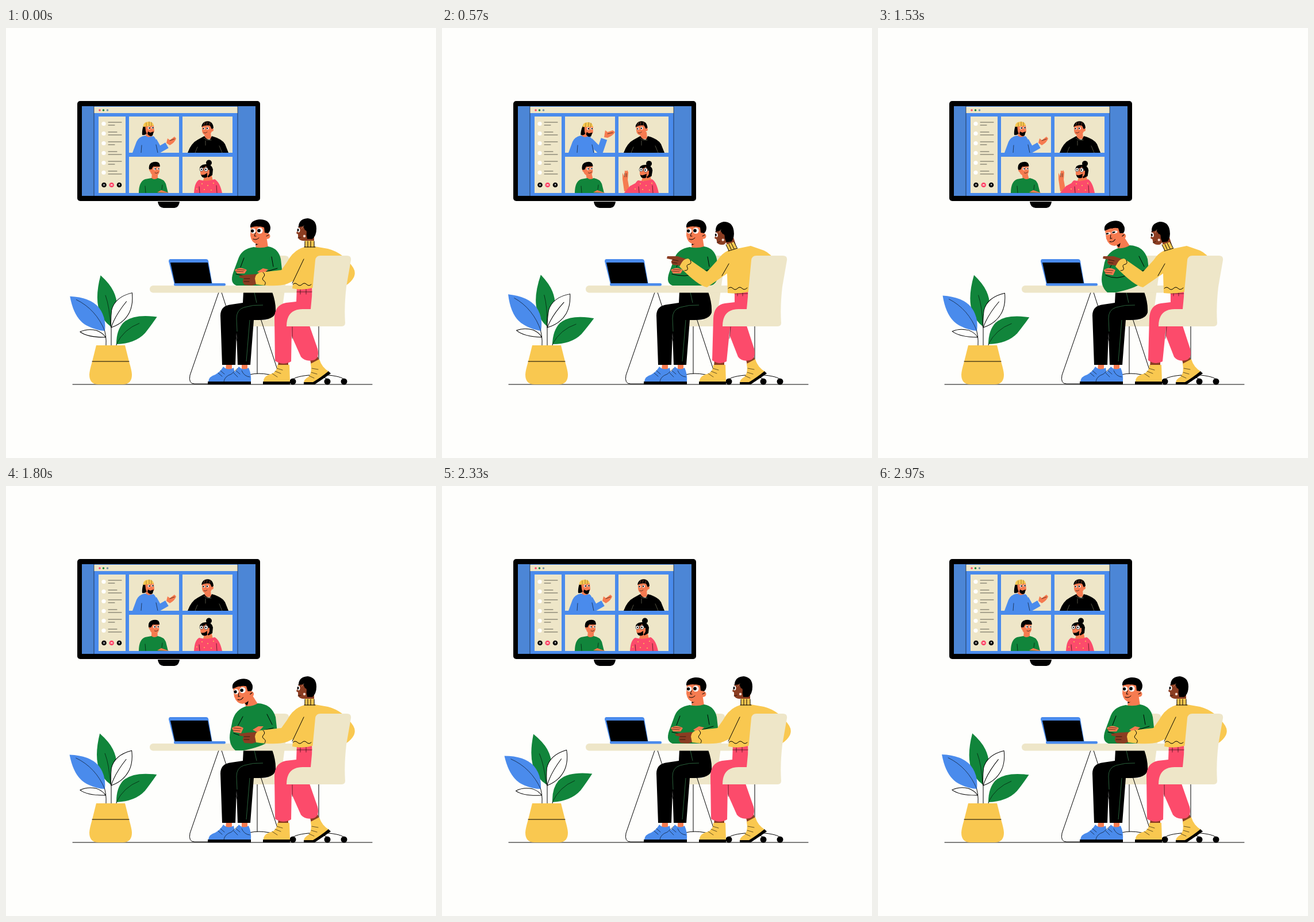
Animation of 748 by 748 pixels, one loop 3000 ms. Source, as an HTML page:

```html
<!DOCTYPE html>
<html lang="en">
<head>
<meta charset="utf-8">
<title>Team call</title>
<style>
html, body { margin: 0; width: 100%; height: 100%; overflow: hidden; background: #fefefc; }
body > svg { display: block; width: 100%; height: 100%; }
.ink { fill: none; stroke: #000; stroke-width: 1; stroke-linecap: round; stroke-linejoin: round; }
.thin { stroke-width: .6; }
.seam { fill: none; stroke: #2f6b42; stroke-width: .9; }
.blue { fill: #4a8bec; } .green { fill: #11853b; } .yellow { fill: #f9c850; }
.pink { fill: #fc4b6b; } .cream { fill: #eee6c8; } .skin { fill: #f67b50; }
.brown { fill: #8b3d22; } .white { fill: #fff; }
.blink { transform-box: fill-box; transform-origin: center; }
</style>
</head>
<body>
<svg viewBox="0 0 748 748">
  <path class="ink" d="M116 620H637"/>

  <!-- Wall screen -->
  <rect x="124" y="127" width="318" height="174" rx="5"/>
  <path d="M264 302H302Q301 312 293 313H274Q265 312 264 302Z"/>
  <rect class="blue" x="132" y="136" width="302" height="156"/>
  <path fill="#4c86d6" d="M132 136H153V292H132ZM403 136H434V292H403Z"/>
  <path class="cream" d="M153 137H403V148H153ZM161 154H208V287H161Z"/>
  <path class="ink thin" d="M153 136V292M403 136V292"/>
  <circle class="pink" cx="163" cy="143" r="1.8"/>
  <circle class="green" cx="169.5" cy="143" r="1.8"/>
  <circle cx="176.5" cy="143" r="1.8" fill="#7390a8"/>
  <g id="list"></g>
  <circle cx="170.5" cy="273" r="4.3"/>
  <circle class="pink" cx="183.7" cy="273" r="4.3"/>
  <circle cx="197" cy="273" r="4.3"/>
  <path d="M169 273H172M197 271V274M182 273.5Q183.7 272 185.5 273.5" fill="none" stroke="#fff" stroke-width="1.4"/>

  <svg x="214" y="154" width="87" height="63" viewBox="214 154 87 63">
    <rect class="cream" x="214" y="154" width="87" height="63"/>
    <path class="skin" d="M244 180H254V190H243Z"/>
    <path class="blue" d="M220 217L227 198Q231 189 242 187L248 190L256 188Q263 191 265 217Z"/>
    <path data-k="wave" d="M257 196L266 212L280 204" data-b="M257 196L275 214L282 193" fill="none" stroke="#4a8bec" stroke-width="11" stroke-linejoin="round"/>
    <path class="ink thin" d="M235 217L236 204M261 203L264 217"/>
    <path class="skin" data-k="wave" d="M279 200L281 192L285 195L293 189L296 192Q294 199 285 204Z" data-b="M282 190L284 178L288 181L297 178L301 181Q298 187 288 191Z"/>
    <path class="ink thin" data-k="wave" d="M285 196L293 193" data-b="M288 184L297 182"/>
    <g data-k="nod" data-m="5 1 5 248 178">
      <path d="M239 170Q236 180 237 186Q242 187 245 183L247 171Z"/>
      <path class="skin" d="M242 170L257 169L258 180Q255 187 250 186Q244 185 243 179Z"/>
      <path d="M247 180L251 182L257 180L255 187Q250 190 246 184Z"/>
      <path class="yellow" d="M239 172Q238 164 247 163Q256 162 257 170Z"/>
      <path class="ink thin" stroke-opacity=".6" d="M244 165V171M249 163V170M253 164V170"/>
      <circle class="white" cx="249" cy="174" r="2.3"/><circle class="white" cx="255" cy="173.500" r="2"/>
      <circle cx="249.500" cy="174" r="1.3"/><circle cx="255.500" cy="173.500" r="1.2"/>
    </g>
  </svg>

  <svg x="307" y="154" width="87" height="63" viewBox="307 154 87 63">
    <rect class="cream" x="307" y="154" width="87" height="63"/>
    <path class="skin" d="M346 181H356L357 193H345Z"/>
    <path d="M316 217Q322 200 334 194L345 188Q349 195 355 194L358 188Q376 193 381 202L387 217Z"/>
    <path class="ink thin" style="stroke:#8a8a70" d="M333 207L329 217M371 205L376 217M344 191Q350 197 357 195M347 196V204"/>
    <g data-k="nod" data-m="-3 0 -4 349 178">
      <path class="skin" d="M341 169L357 168L359 178Q355 188 348 187Q341 185 341 178Z"/>
      <circle class="skin" cx="358" cy="177" r="3"/>
      <path d="M340 172Q341 163 350 162Q360 162 361 174L358 176L355 170Q347 168 340 172Z"/>
      <path class="ink thin" style="stroke:#c96a45" d="M346 164L344 169M350 163L349 168M355 164L354 169"/>
      <circle class="white" cx="344" cy="175" r="2"/><circle class="white" cx="350.500" cy="174.500" r="2.300"/>
      <circle cx="343.500" cy="175" r="1.200"/><circle cx="350" cy="174.500" r="1.300"/>
      <path class="ink thin" d="M344 182Q347 184 350 181"/>
    </g>
  </svg>

  <svg x="214" y="224" width="87" height="63" viewBox="214 224 87 63">
    <rect class="cream" x="214" y="224" width="87" height="63"/>
    <path class="skin" data-k="turn" d="M254 252L264 252L264 264L253 263Z" data-b="M250 252L260 252L263 264L252 263Z"/>
    <path class="green" d="M231 287Q231 267 242 263L253 261Q258 265 264 261Q275 263 278 271L282 287Z"/>
    <path class="ink thin" d="M242 275L243 287M272 273L271 281"/>
    <path class="skin" d="M263 286L270 282L284 287Z"/>
    <g data-k="turn" data-m="-5 0 -4 260 246">
      <path class="skin" d="M251 239H267V250Q265 257 260 257Q252 256 251 250Z"/>
      <circle class="skin" cx="252" cy="247" r="2.800"/>
      <path d="M249 246Q247 235 257 233Q268 231 268 241L256 241L253 246Z"/>
      <circle class="white" cx="259" cy="245" r="2.300"/><circle class="white" cx="265" cy="245" r="2"/>
      <circle cx="259.500" cy="245" r="1.200"/><circle cx="265.500" cy="245" r="1.100"/>
      <path class="ink thin" d="M259 252Q262 254 265 251"/>
    </g>
  </svg>

  <svg x="307" y="224" width="87" height="63" viewBox="307 224 87 63">
    <rect class="cream" x="307" y="224" width="87" height="63"/>
    <g data-k="hello" data-m="0 -62 0 0 0"><g id="palm">
      <path class="skin" d="M317 346L314 325L314 314L317 320L318 310L321 311L322 309L324 313L323 326L327 348Z"/>
      <path class="pink" d="M315 351L327 337L340 330L346 350Z"/>
      <path class="ink thin" d="M318 321V315M321 321V315"/>
    </g></g>
    <path class="skin" data-k="hello" d="M346 253L357 253L360 266L343 266Z" data-b="M351 253L362 253L364 266L347 266Z"/>
    <path class="pink" data-k="hello" d="M327 287Q328 268 336 264Q350 268 363 263Q372 268 376 287Z" data-b="M335 287Q333 270 341 265Q354 268 365 263Q373 267 377 287Z"/>
    <path class="ink thin" data-k="hello" d="M336 276L337 287M366 274L367 287" data-b="M342 276L343 287M366 274L367 287"/>
    <g class="yellow" data-k="hello" data-m="4 0 0 0 0">
      <circle cx="341" cy="271" r="1"/><circle cx="351" cy="274" r="1"/><circle cx="361" cy="270" r="1"/>
      <circle cx="345" cy="281" r="1"/><circle cx="357" cy="282" r="1"/><circle cx="332" cy="280" r="1"/>
    </g>
    <g data-k="hello" data-m="6 1 4 348 250">
      <circle cx="353" cy="234.500" r="5"/>
      <path d="M337 246Q336 238 347 237Q358 236 360 246L359 256L352 260L345 250Z"/>
      <path class="skin" d="M338 244Q346 244 348 240Q350 247 354 247V253Q351 260 345 260Q338 258 338 251Z"/>
      <path d="M339 255Q344 257 350 252L350 259Q346 262 341 259Z"/>
      <circle class="ink thin" cx="340" cy="246" r="3.200" style="fill:#fff"/>
      <circle class="ink thin" cx="348" cy="246" r="3.400" style="fill:#fff"/>
      <circle cx="340" cy="246" r="1.200"/><circle cx="347.500" cy="246" r="1.300"/>
    </g>
  </svg>

  <!-- Plant -->
  <path class="ink" d="M174 552Q175 535 170 522M183 552V505M192 552Q194 537 203 526"/>
  <path class="green" data-k="sway" data-m="0 0 4 183 530" d="M166 430Q157 462 161 484Q165 506 182 519Q202 488 188 458Q182 445 166 430Z"/>
  <path class="ink thin" data-k="sway" data-m="0 0 4 183 530" d="M174 465Q181 485 182 519"/>
  <g data-k="sway" data-m="0 0 3.200 174 530">
    <path class="blue" d="M112 466Q119 508 144 519Q158 526 172 527Q175 503 162 486Q147 468 112 466Z"/>
    <path class="ink thin" d="M123 472Q157 489 172 527"/>
  </g>
  <g class="ink" data-k="sway" data-m="0 0 2.900 183 525">
    <path d="M220 461Q190 468 184 491Q182 508 183 521Q205 514 215 495Q222 481 220 461Z" fill="#fefefc"/>
    <path d="M210 476Q190 500 183 521"/>
  </g>
  <path class="ink" data-k="sway" data-m="0 0 3 174 540" d="M129 528Q142 522 158 526Q170 531 173 538Q142 538 129 528Z" fill="#fefefc"/>
  <g data-k="sway" data-m="0 0 2 192 551">
    <path class="green" d="M263 503Q221 497 204 513Q192 526 192 550Q225 549 242 531Q251 520 263 503Z"/>
    <path class="ink thin" d="M192 550Q205 524 232 514"/>
  </g>
  <path class="yellow" d="M157 552H207L214 580Q219 597 219 603Q219 620 203 620H161Q145 620 145 603Q145 597 150 580Z"/>
  <path class="ink" d="M150 580H214"/>

  <!-- Rear chair and table legs -->
  <path class="ink" d="M437 519V601M410 608Q437 594 476 608"/>
  <path class="cream" d="M455 396H485Q493 396 492 404L481 485Q484 519 490 519H426V508H455Z"/>
  <path class="ink" d="M370 460L320 604Q317 619 328 619H352M375 460L420 600M428 460L474 600"/>

  <!-- Seated man -->
  <path class="skin" d="M383 584H393V596H382ZM410 584H420V596H410Z"/>
  <path class="blue" d="M352 615Q353 606 364 603Q373 598 378 589Q386 597 396 591L401 615Z"/>
  <path d="M351 615H401V620H351Z"/>
  <path class="blue" d="M378 615Q380 606 392 602Q400 598 405 589Q413 597 422 591Q427 602 426 615Z"/>
  <path d="M377 615H426V620H377Z"/>
  <path class="ink thin" d="M379 615Q380 606 392 602L403 592M369 600L376 606M373 596L380 602M396 600L403 607M400 596L407 602M410 596Q414 606 424 607"/>
  <path d="M413 459H463Q470 478 469 495Q465 508 440 508H431L425 586H403L401 530L399 586H376L373 500Q373 483 392 481L412 478Z"/>
  <path class="seam" d="M402 528L401 505Q401 490 414 486Q430 481 447 482M424 508L418 580M432 460L436 478"/>
  <rect class="cream" x="250" y="448" width="286" height="12.500" rx="6"/>
  <path class="skin" data-k="man" d="M436 364L434 383Q445 388 456 382L453 362Z" data-b="M409 366L417 383Q428 386 438 379L426 360Z"/>
  <path data-k="man" d="M436 371L434 378Q441 376 447 368Z" data-b="M412 373L419 382Q422 378 422 368Z"/>
  <path class="green" data-k="man" d="M431 381Q411 384 405 399L395 426Q389 444 401 448L466 448Q482 446 480 420L478 402Q474 383 456 380Q444 384 431 381Z" data-b="M418 383Q399 389 394 408L390 428Q386 449 399 460L414 460Q476 447 471 420L469 402Q462 379 438 378Q429 384 418 383Z"/>
  <path class="ink" data-k="man" d="M414 400L408 416M400 428Q422 435 446 426L472 418M462 398L465 415" data-b="M412 401L403 418M396 430Q416 440 436 428L465 421M454 397L463 415"/>
  <path class="skin" data-k="man" d="M398 421Q407 414 419 421L415 427L402 427Z" data-b="M393 421Q402 414 413 421L409 430L396 428Z"/>
  <path class="skin" data-k="man" d="M437 424L447 418L456 420L446 429Z" data-b="M429 424L439 418L448 418L438 429Z"/>
  <path class="ink thin" data-k="man" d="M400 423L413 424M402 420L415 421" data-b="M394 425L407 426M396 421L409 422"/>
  <g data-k="man" data-m="-29 3 -11 439 357">
    <path class="skin" d="M426 343H454L455 358Q454 375 437 376Q427 374 425 361Z"/>
    <circle class="skin" cx="454.500" cy="362" r="5"/>
    <path d="M425 347Q424 335 440 333Q458 332 460 347Q460 354 456 357L450 356L449 347Q438 343 425 347Z"/>
    <g class="blink">
      <circle class="white" cx="430" cy="353" r="4.500"/><circle class="white" cx="441.500" cy="352.500" r="5.200"/>
      <circle cx="428.500" cy="353" r="2.700"/><circle cx="440" cy="352.500" r="2.900"/>
    </g>
    <path class="ink" d="M426 346L431 345M438 345L445 344M430 367Q435 370 440 365M434 356L432 362H435M453 362L457 360"/>
  </g>

  <!-- Laptop -->
  <path class="blue" d="M286 402H348Q351 402 352 405L359 446H293L283 406Q283 402 286 402Z"/>
  <path d="M286 408H351L358 445H294Z"/>
  <rect class="blue" x="292" y="444" width="90" height="4.500" rx="2"/>

  <!-- Front chair base and seated woman -->
  <path class="ink" d="M544 519V604M499 611Q508 604 544 603Q580 604 588 611M544 603L559 611"/>
  <circle cx="499" cy="615" r="5.500"/><circle cx="559" cy="615" r="5.500"/><circle cx="588" cy="615" r="5.500"/>
  <path class="brown" d="M474 576H491V590H473ZM528 573L542 571L546 582L531 586Z"/>
  <path class="yellow" d="M472 586L493 586L494 615H448Q448 605 461 602Q472 598 472 586Z"/>
  <path d="M447 615H494V620H447Z"/>
  <path class="yellow" d="M530 584L545 576Q549 590 562 598L536 618H518Q518 611 526 607Q533 600 530 584Z"/>
  <path d="M518 616H534Q546 609 561 597L565 601Q552 610 537 620H518Z"/>
  <path class="ink thin" d="M463 601L472 607M468 597L478 601M471 592L481 595M527 605L536 609M531 599L541 602M532 592L543 594"/>
  <path class="pink" data-k="woman" d="M497 515L527 515L542 558Q546 575 534 578Q521 581 513 572L497 536Z" data-b="M500 515L529 515L543 558Q547 575 535 578Q522 581 515 572L501 536Z"/>
  <path class="pink" data-k="woman" d="M506 450L532 450L534 495L520 492Q500 492 497 520L496 580Q482 588 468 579L467 505Q467 482 487 478L505 476Z" data-b="M509 454L532 454L534 495L520 492Q502 492 501 520L495 580Q482 587 470 578L472 505Q473 482 492 479L509 477Z"/>
  <path class="ink thin" data-k="woman" d="M506 459L532 459M512 454L512 463M522 454L522 463M498 520L498 540" data-b="M509 462L532 462M514 457L514 466M523 457L523 466M502 520L500 540"/>
  <path class="brown" data-k="woman" d="M436 428L420 429L406 431L406 434L414 436Q409 440 415 447L428 448L437 445Z" data-b="M425 402L410 397L392 397L391 401L401 403Q396 407 402 412L412 413L418 414Z"/>
  <path class="ink thin" data-k="woman" d="M414 436L424 436M414 441L423 441" data-b="M401 403L411 405M401 408L409 409"/>
  <path class="yellow" data-k="woman" d="M519 381Q500 386 489 407L479 421L443 425Q434 427 433 436L435 446Q471 451 489 445L500 440L498 453Q516 457 533 452L560 455Q590 455 603 437Q610 427 604 417Q587 391 560 384L537 380Z" data-b="M498 387Q487 392 480 403L461 424L428 401Q420 402 417 408L413 415Q446 449 461 451L496 427L497 461Q516 463 533 459L560 455Q575 445 580 430Q583 420 578 405Q573 393 560 387L537 379Z"/>
  <path class="ink" data-k="woman" d="M518 402L498 444" data-b="M499 410L487 431"/>
  <path class="ink" data-k="woman" d="M447 425Q452 429 448 433Q444 437 449 440Q453 443 450 447" data-b="M432 404Q435 410 430 411Q424 412 427 417Q429 422 422 422"/>
  <path class="ink" data-k="woman" d="M499 446Q503 442 507 446Q511 450 515 446Q519 442 523 446Q527 450 531 446" data-b="M498 453Q502 449 506 453Q510 457 514 453Q518 449 522 453Q526 457 531 452"/>
  <path class="brown" data-k="woman" d="M520 358L536 355L536 374L520 374Z" data-b="M492 366L506 361L511 377L497 381Z"/>
  <path class="yellow" data-k="woman" d="M520 370L536 370L537 384L519 384Z" data-b="M494 377L508 372L514 384L499 390Z"/>
  <path class="ink" data-k="woman" d="M520 371L520 381M525 371L525 381M530 371L530 381M536 371L536 381M519 381L538 381" data-b="M494 377L499 387M499 376L503 385M503 374L508 384M508 372L513 382M498 388L514 383"/>
  <g data-k="woman" data-m="-32 6 -9 524 351">
    <path class="brown" d="M510 341L508 349L505 357L508 359V365Q511 371 520 370L530 362V340Z"/>
    <path d="M509 346Q509 332 525 331Q540 333 540 349Q540 361 533 367H524L522 356L517 345Z"/>
    <path class="brown" d="M516 354Q522 349 523 355Q523 362 517 361Z"/>
    <circle cx="519" cy="362" r="2.200" fill="#f6d9cd"/>
    <ellipse class="white" cx="509" cy="351.500" rx="2.500" ry="4"/>
    <ellipse cx="508" cy="351.500" rx="1.500" ry="2.400"/>
    <path class="ink thin" d="M508 346L513 345M508 365L513 364"/>
    <path class="ink thin" style="stroke:#e8b090" d="M514 349L518 344"/>
  </g>
  <path class="cream" d="M488 519Q488 489 516 489H530L538 404Q539 396 547 396H593Q601 396 600 404L592 450Q588 485 590 513Q590 519 583 519Z"/>
</svg>
<script>
const LOOP = 3000;

// [time, value] keys, eased in between
const tracks = {
  woman: [[0, 0], [120, -.12], [460, 1], [1540, 1], [1730, -.1], [1800, 0]],
  man: [[600, 0], [950, 1], [1880, 1], [2220, 0]],
  wave: [[0, 0], [200, -.5], [560, 1], [1030, -.7], [1500, 0]],
  nod: [[150, 0], [500, 1], [1130, 1], [1500, 0]],
  turn: [[150, 0], [500, 1], [1530, 1], [1790, .15], [2250, 0]],
  hello: [[100, 0], [460, 1], [1540, 1], [1790, 0]],
  blink: [[1440, 1], [1510, .45], [1550, .45], [1640, 1]]
};

function valueAt(keys, t) {
  const i = keys.findIndex(([time]) => time > t);
  if (i < 0) return keys[keys.length - 1][1];
  if (!i) return keys[0][1];
  const [t0, v0] = keys[i - 1], [t1, v1] = keys[i];
  const p = (t - t0) / (t1 - t0);
  return v0 + (v1 - v0) * p * p * (3 - 2 * p);
}

const list = document.getElementById('list');
for (let i = 0; i < 6; i++) {
  const y = 166 + 17 * i, [a, b] = i % 2 ? [193, 201] : [201, 189];
  list.innerHTML += `<circle class="white" cx="170" cy="${y + .5}" r="3.600"/>
    <path class="ink thin" d="M178 ${y - 2}H${a}M178 ${y + 3}H${b}"/>`;
}

const NUMBER = /-?\d+(\.\d+)?/g;
const parts = [...document.querySelectorAll('[data-k]')].map(el => {
  const { k, b, m } = el.dataset;
  if (m) {
    const [x, y, turn, cx, cy] = m.split(' ').map(Number);
    return v => el.setAttribute('transform',
      `translate(${x * v[k]} ${y * v[k]}) rotate(${turn * v[k]} ${cx} ${cy})`);
  }
  const from = el.getAttribute('d'), to = b.match(NUMBER);
  return v => {
    let i = 0;
    el.setAttribute('d', from.replace(NUMBER, n => +n + (to[i++] - n) * v[k]));
  };
});
const eyes = document.querySelector('.blink');
const palm = document.getElementById('palm');

function draw(now) {
  const t = now % LOOP, v = {};
  for (const name in tracks) v[name] = valueAt(tracks[name], t);
  v.sway = Math.sin(2 * Math.PI * (t - 100) / LOOP);
  parts.forEach(update => update(v));
  eyes.style.transform = `scaleY(${v.blink})`;
  palm.setAttribute('transform', `rotate(${4 * Math.sin(2 * Math.PI * (t - 570) / 480)} 326 348)`);
  requestAnimationFrame(draw);
}
const start = performance.now();
requestAnimationFrame(function first() { draw(0); });
draw = (inner => now => inner(Math.max(0, now - start)))(draw);
</script>
</body>
</html>
```
